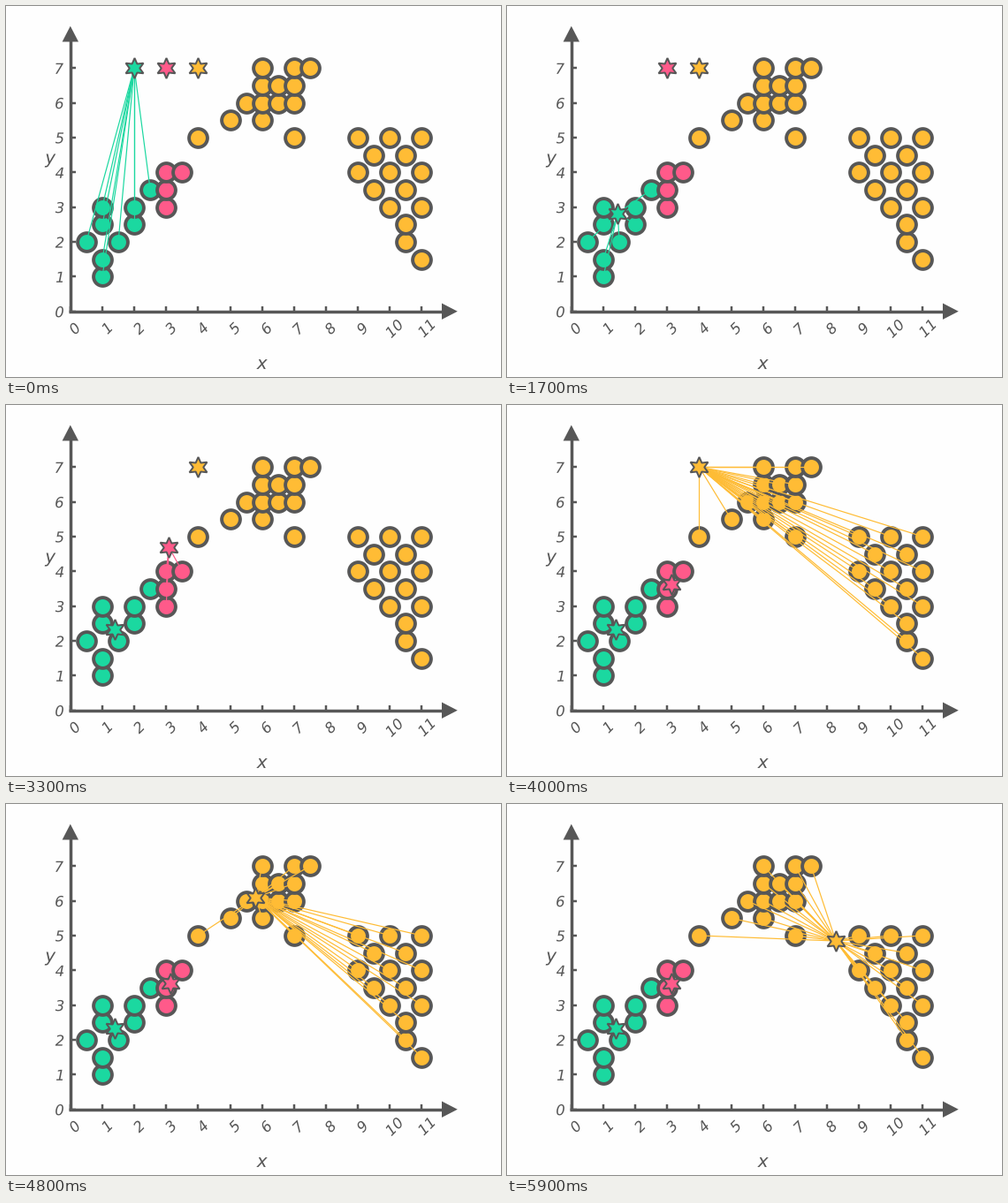
These frames come from a looping animation (560 by 420 pixels, 6000 ms). A matplotlib script:

```python
import numpy as np
import matplotlib.pyplot as plt
from itertools import product
from matplotlib.animation import FuncAnimation
from matplotlib.collections import LineCollection
from matplotlib.patches import PathPatch
from matplotlib.textpath import TextPath
from matplotlib.transforms import Affine2D

W, H, DPI = 560, 420, 70
PX = 72 / DPI                       # points per pixel
X0, Y0, DX, DY = 72.8, 345.7, 36.15, 39.35
GREY, BACK = "#575757", "#fefefe"
FONT = {"family": "DejaVu Sans", "style": "italic"}
STEPS = 20


def grid(xs, ys):
    return list(product(xs, ys))


low = (grid([1], [1, 1.5]) + grid([1, 2], [2.5, 3])
       + [(.5, 2), (1.5, 2), (2.5, 3.5)])
middle = grid([3], [3, 3.5, 4]) + [(3.5, 4)]
top = (grid([6, 6.5, 7], [6, 6.5]) + grid([6, 7], [7])
       + [(4, 5), (5, 5.5), (5.5, 6), (6, 5.5), (7, 5), (7.5, 7)])
# Checkerboard below y = 5, cut off by a falling diagonal
fan = [(x, y) for x, y in grid(np.arange(9, 11.5, .5), np.arange(2.5, 5.5, .5))
       if (x + y) % 1 == 0 and x + y >= 13]
fan += [(10.5, 2), (11, 1.5)]

GROUPS = [
    ("#1bd8a0", np.array([2, 7]), np.array(sorted(low))),
    ("#ff5a8a", np.array([3, 7]), np.array(sorted(middle))),
    ("#ffbc35", np.array([4, 7]), np.array(sorted(top + fan))),
]


def to_px(points):
    return np.array([X0, Y0]) + points * np.array([DX, -DY])


def write(text, x, y, size=16.5, angle=0):
    """Text with its ink centred on x, y in pixels."""
    path = TextPath((0, 0), text, size=size, prop=FONT)
    box = path.get_extents()
    place = (Affine2D().translate(-(box.x0 + box.x1) / 2, -(box.y0 + box.y1) / 2)
             .rotate_deg(angle).scale(1, -1).translate(x, y))
    ax.add_patch(PathPatch(place.transform_path(path), fc=GREY, lw=0))


def rule(x1, y1, x2, y2, width):
    ax.plot([x1, x2], [y1, y2], color=GREY, lw=width * PX, solid_capstyle="butt", zorder=1)


fig = plt.figure(figsize=(W / DPI, H / DPI), dpi=DPI, facecolor=BACK)
ax = fig.add_axes([0, 0, 1, 1])
ax.set(xlim=(0, W), ylim=(H, 0))
ax.axis("off")

# Axes with arrow heads, ticks and labels
rule(X0, 36, X0, Y0 + 1.7, 3.5)
rule(X0 - 1.7, Y0, 498, Y0, 3.5)
ax.fill([X0, X0 - 9.2, X0 + 9.2], [22.7, 40.5, 40.5], color=GREY, lw=0)
ax.fill([510.8, 493, 493], [Y0, Y0 - 9.2, Y0 + 9.2], color=GREY, lw=0)
for k in range(12):
    x = X0 + k * DX
    rule(x, Y0, x, Y0 - 6, 2.5)
    write(str(k), x + 4.7, 365, angle=45)
for k in range(8):
    y = Y0 - k * DY
    rule(X0, y, X0 + 6, y, 2.5)
    write(str(k), 60.5, y + .5)
write("x", 289.5, 405.5, size=20)
write("y", 50, 175, size=20)

for color, _, points in GROUPS:
    ax.scatter(*to_px(points).T, s=(20.8 * PX) ** 2, c=color,
               edgecolors=GREY, linewidths=3.9 * PX, zorder=3)

links = LineCollection([], linewidths=1.2 * PX, zorder=4)
ax.add_collection(links)
stars = [ax.plot([], [], marker=(6, 1, 0), ms=23 * PX, mfc=color, mec=GREY,
                 mew=2 * PX, ls="none", zorder=5)[0] for color, _, _ in GROUPS]


def update(frame):
    active = frame // STEPS
    for i, (color, start, points) in enumerate(GROUPS):
        t = np.clip((frame - i * STEPS) / (STEPS - 1), 0, 1)
        center = to_px(start + (points.mean(axis=0) - start) * t)
        stars[i].set_data([center[0]], [center[1]])
        if i == active:
            links.set_segments([(center, p) for p in to_px(points)])
            links.set_color(color)
    return [links, *stars]


anim = FuncAnimation(fig, update, frames=3 * STEPS, interval=100,
                     repeat=True, repeat_delay=0, blit=False)
plt.show()
```
